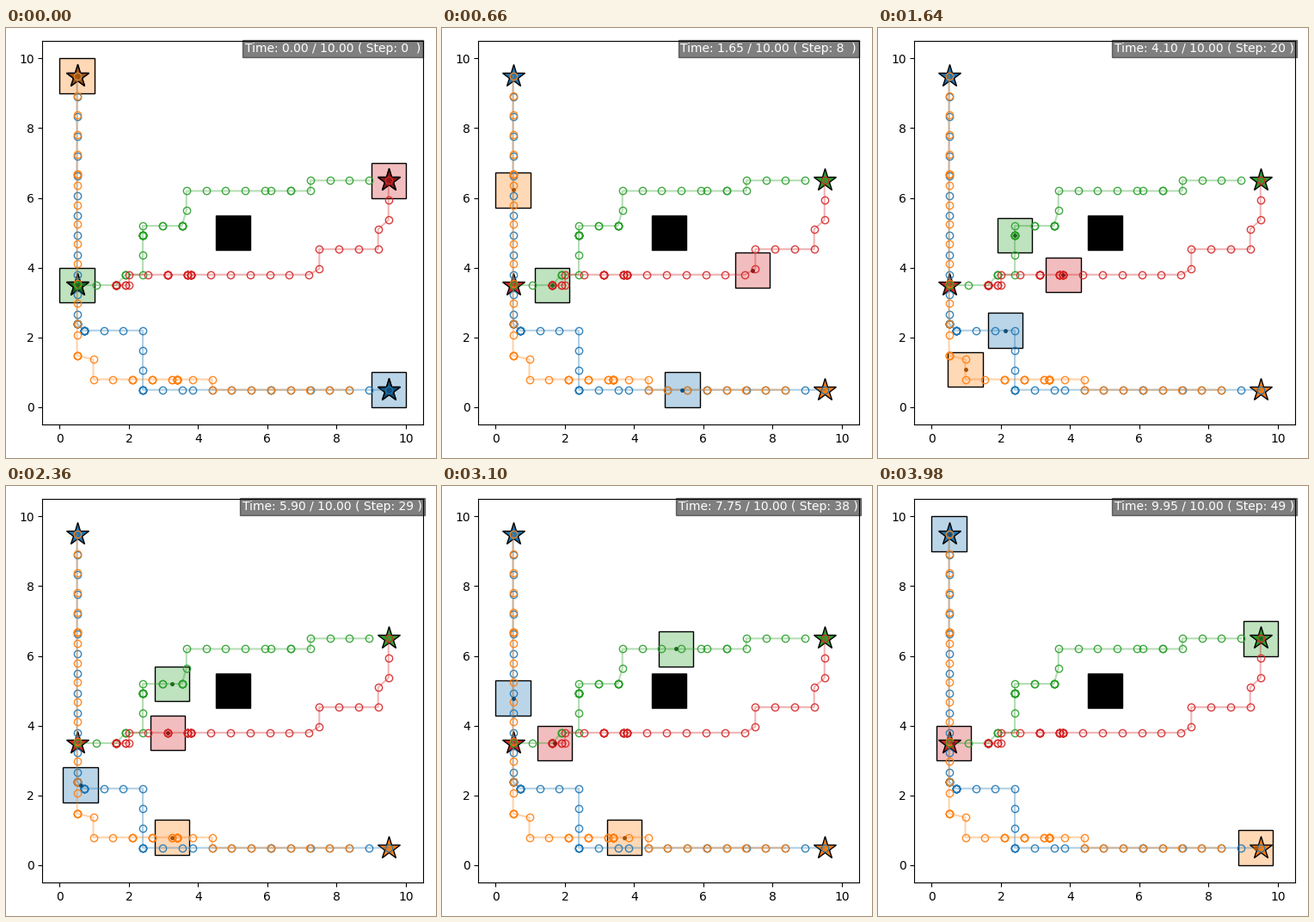
Recreate the animation shown at these times as a matplotlib script. Size 500 px wide and 500 px high, loop 4000 ms.

```python
import numpy as np
import matplotlib.pyplot as plt
from matplotlib.animation import FuncAnimation
from matplotlib.colors import to_rgb, to_rgba
from matplotlib.patches import Rectangle

STEPS = 50                  # planning steps
SUB = 4                     # drawn frames per planning step
DT = 0.05
REACH = 0.4 * np.sqrt(2)    # longest move in one step, |dx| + |dy|

# Stops of each route: x, y and the steps spent waiting there.
ROUTES = {
    "C0": [(9.5, 0.5), (6.1, 0.5, 1), (3.53, 0.5), (2.4, 0.5, 3), (2.4, 2.2),
           (0.7, 2.2, 6), (0.5, 2.4, 4), (0.5, 2.67), (0.5, 9.5)],
    "C1": [(0.5, 9.5), (0.5, 6.67, 2), (0.5, 6.37), (0.5, 2.4), (0.5, 2.08),
           (0.5, 1.48, 2), (0.97, 1.37), (0.97, 0.8), (2.1, 0.8, 2),
           (2.66, 0.8, 2), (3.24, 0.8, 1), (3.4, 0.8, 7), (3.83, 0.8),
           (4.4, 0.8), (4.4, 0.5), (9.5, 0.5)],
    "C2": [(0.5, 3.5), (1.63, 3.5, 11), (1.9, 3.8, 2), (2.4, 3.8),
           (2.4, 4.93, 7), (2.4, 5.2), (2.97, 5.2, 1), (3.53, 5.2, 4),
           (3.66, 5.64), (3.66, 6.2), (6.1, 6.2), (6.67, 6.2, 1),
           (7.24, 6.2), (7.24, 6.5), (9.5, 6.5)],
    "C3": [(9.5, 6.5), (9.5, 5.37), (9.2, 5.1), (9.2, 4.53), (7.5, 4.53),
           (7.5, 3.97), (7.2, 3.8), (3.8, 3.8, 6), (3.69, 3.8, 5),
           (3.12, 3.8, 5), (2, 3.8), (2, 3.5), (1.9, 3.5, 1),
           (1.63, 3.5, 9), (0.5, 3.5)],
}


def drive(route):
    """Position at every step: full speed, with a short move into each stop."""
    path = [np.array(route[0])]
    for x, y, *wait in route[1:]:
        start, stop = path[-1], np.array([x, y])
        dist = np.abs(stop - start).sum()
        moves = int(np.ceil(dist / REACH - 0.08))
        path += [start + (stop - start) * j * REACH / dist
                 for j in range(1, moves)]
        path += [stop] * (1 + sum(wait))
    path += [path[-1]] * (STEPS + 1 - len(path))
    return np.array(path[:STEPS + 1])


def dark(color):
    return tuple(0.65 * c for c in to_rgb(color))


class Vehicle:
    def __init__(self, ax, color, route):
        self.path = drive(route)
        xs, ys = self.path[:STEPS - 1].T
        self.box = ax.add_patch(Rectangle((0, 0), 1, 1, ec="black", lw=1,
                                          fc=to_rgba(color, 0.3)))
        star = dict(marker="*", ms=20, mec="black")
        ax.plot(*route[-1][:2], mfc=color, zorder=2, **star)
        self.start, = ax.plot(*route[0], mfc=dark(color), zorder=2.1, **star)
        ax.plot(xs, ys, color=color, alpha=0.35, zorder=3)
        ax.plot(xs, ys, "o", mfc="none", mec=color, alpha=0.9, zorder=3)
        self.dot, = ax.plot([], [], "o", ms=2.5, color=dark(color), zorder=4)

    def place(self, i):
        k, part = divmod(i, SUB)
        a, b = self.path[k:k + 2]
        x, y = a + (b - a) * part / SUB
        self.box.set_xy((x - 0.5, y - 0.5))
        self.dot.set_data([x], [y])
        self.start.set_visible(i == 0)


fig, ax = plt.subplots(figsize=(5, 5), dpi=100)
ax.set(xlim=(-0.5, 10.5), ylim=(-0.5, 10.5))
fig.tight_layout()

ax.add_patch(Rectangle((4.5, 4.5), 1, 1, color="black"))
vehicles = [Vehicle(ax, color, route) for color, route in ROUTES.items()]
label = ax.text(0.762, 0.98, "", transform=ax.transAxes, color="white",
                ha="center", va="center", zorder=6,
                bbox=dict(facecolor="black", alpha=0.5, pad=2))


def update(i):
    for vehicle in vehicles:
        vehicle.place(i)
    label.set_text(f"Time: {i * DT:.2f} / {STEPS * SUB * DT:.2f} "
                   f"( Step: {i // SUB:<2d} )")
    return []


anim = FuncAnimation(fig, update, frames=STEPS * SUB, interval=20,
                     repeat=True, repeat_delay=0)
plt.show()
```
